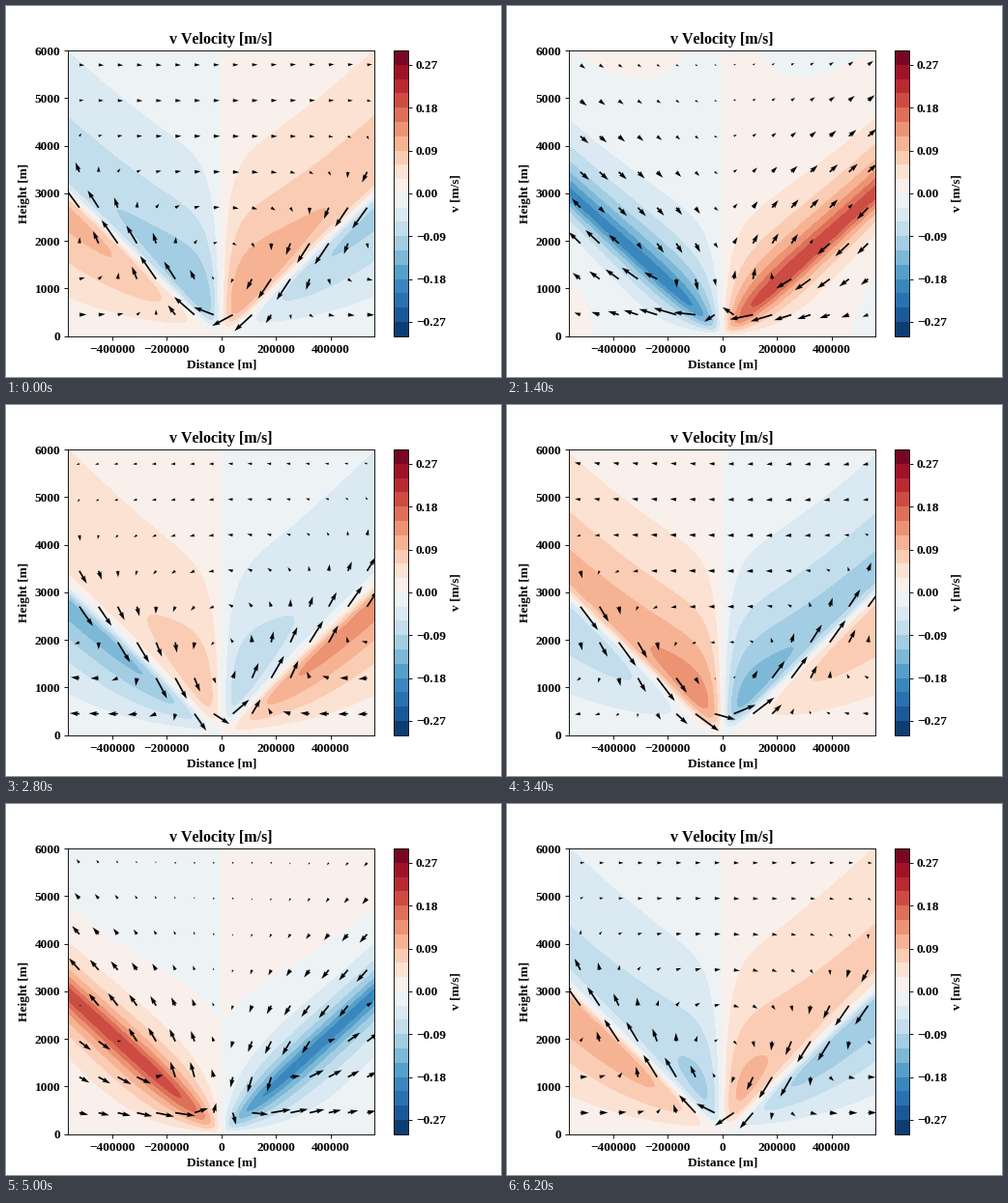
Animation of 512x384 px, one loop 6.4 s. Source, as a matplotlib script:

```python
import numpy as np
import matplotlib.pyplot as plt
from matplotlib.animation import FuncAnimation

plt.rcParams.update({
    "font.family": "Liberation Serif",
    "font.size": 12,
    "font.weight": "bold",
    "axes.labelweight": "bold",
    "axes.titleweight": "bold",
    "text.kerning_factor": 6,
})

FRAMES, INTERVAL = 32, 200
HALF_WIDTH, TOP = 561e3, 6000.0      # domain [m]
RAY_SLOPE = 0.00529                  # sqrt(omega^2 - f^2) / N
DECAY = 316e3                        # heating depth over ray slope [m]
COAST = 0.125                        # coastal width over DECAY
AMPLITUDE = 0.113                    # [m/s]
ARROW_PIXELS = 13.8
BACKGROUND = 0.25j                   # uniform oscillating flow
PEAK_FRAME = 8.65                    # crest lies on the rays

# Fourier integral of the linear sea-breeze response over wavenumber
DK = 0.15
k = np.arange(DK / 2, 80, DK)
weight = 2 * DK * np.exp(-COAST * k) / (k**2 + 1)


def response(x, z):
    """Complex amplitudes of u and w on the grid (z, x)."""
    kx = np.outer(x / DECAY, k)
    height = z / (RAY_SLOPE * DECAY)
    still = np.exp(-height)[None, :]
    wave = np.exp(1j * np.outer(k, height))
    u = np.cos(kx) @ (weight[:, None] * (-still - 1j * k[:, None] * wave))
    w = (k * np.sin(kx)) @ (weight[:, None] * (still - wave))
    return u.T + BACKGROUND, w.T


x = np.linspace(-HALF_WIDTH, HALF_WIDTH, 181)
z = np.linspace(0, TOP, 101)
shade = 1j * AMPLITUDE * response(x, z)[1]

arrow_x = -HALF_WIDTH + 2 * HALF_WIDTH * (np.arange(16) + 0.6) / 16
arrow_z = TOP * (np.arange(8) + 0.6) / 8
arrow_u, arrow_w = (ARROW_PIXELS * part for part in response(arrow_x, arrow_z))

levels = np.linspace(-0.3, 0.3, 21)
fig, ax = plt.subplots(figsize=(6.4, 4.8), dpi=80)


def rotation(frame):
    return np.exp(2j * np.pi * (frame - PEAK_FRAME) / FRAMES)


def fill(frame):
    field = (shade * rotation(frame)).real
    return ax.contourf(x, z, field, levels, cmap="RdBu_r")


def arrows(frame):
    turn = rotation(frame)
    return (arrow_u * turn).real, (arrow_w * turn).real


contours = fill(0)
quiver = ax.quiver(arrow_x, arrow_z, *arrows(0), scale_units="dots",
                   scale=1, zorder=2)
ax.set(xlim=(-HALF_WIDTH, HALF_WIDTH), ylim=(0, TOP),
       xticks=np.arange(-400000, 400001, 200000),
       yticks=np.arange(0, 6001, 1000),
       title="v Velocity [m/s]", xlabel="Distance [m]", ylabel="Height [m]")
ax.ticklabel_format(style="plain")

bar = fig.colorbar(contours, ax=ax, ticks=np.arange(-3, 4) * 0.09)
bar.set_label("v [m/s]")


def update(frame):
    global contours
    contours.remove()
    contours = fill(frame)
    quiver.set_UVC(*arrows(frame))
    return []


animation = FuncAnimation(fig, update, frames=FRAMES, interval=INTERVAL,
                          init_func=lambda: [], repeat=True, repeat_delay=0)
plt.show()
```
